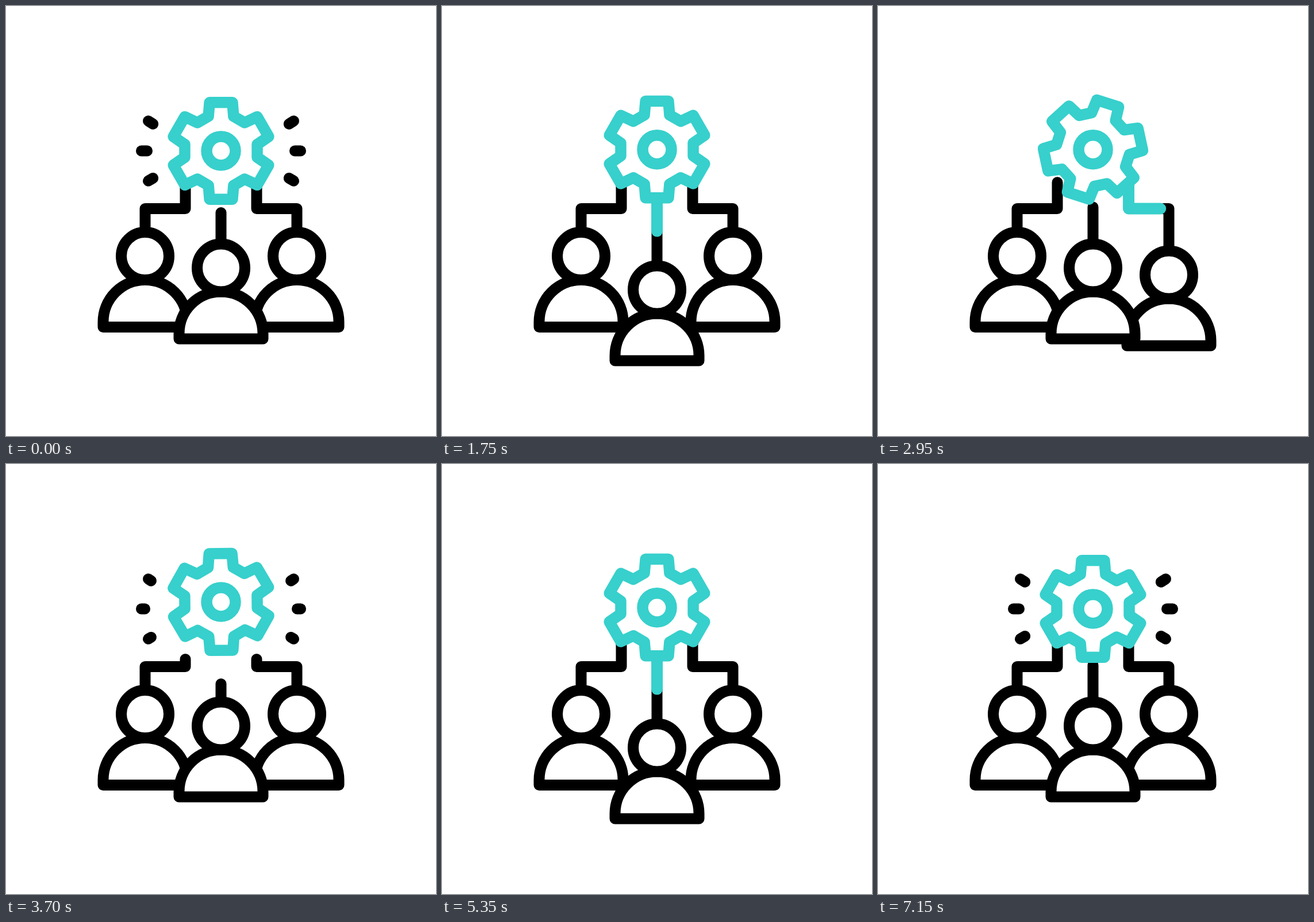
An HTML page with a canvas for the animation above (7.2 s loop, 748 by 748 pixels).

```html
<!DOCTYPE html>
<html lang="en">
<head>
<meta charset="utf-8">
<title>Team gear</title>
<style>
html, body { margin: 0; width: 100%; height: 100%; overflow: hidden; background: #fff; }
canvas { display: block; width: 100vmin; height: 100vmin; }
</style>
</head>
<body>
<canvas id="stage" width="748" height="748"></canvas>
<script>
const ctx = document.getElementById('stage').getContext('2d');
const TEAL = '#37d0cc', BLACK = '#000', WHITE = '#fff';
const CX = 374, CY = 252, CYCLE = 3600, BEAT = 1200, STEP = 50;

// one person per beat: left, middle, right
const people = [
  { x: 242, y: 0, lineX: 312, top: 298, dip: 49, flow: 300 },
  { x: 374, y: 20.5, lineX: 374, top: 341, dip: 38, flow: 380 },
  { x: 506, y: 0, lineX: 436, top: 298, dip: 32.5, flow: 300 }
];

const clamp = v => Math.max(0, Math.min(1, v));
const ramp = (t, a, b) => clamp((t - a) / (b - a));
const ease = u => u < 0.5 ? 2 * u * u : 1 - 2 * (1 - u) * (1 - u);
const swell = u => Math.sin(u * Math.PI / 2) ** 2;

function stroke(color, width) {
  ctx.strokeStyle = color;
  ctx.lineWidth = width;
  ctx.stroke();
}

function trace(points) {
  ctx.beginPath();
  points.forEach(([x, y]) => ctx.lineTo(x, y));
}

function dipAt(p) {
  return p < 550 ? swell(ramp(p, 265, 550)) : 1 - swell(ramp(p, 550, 870));
}

function hopAt(p) {
  return p < 600 ? 68 * Math.sin(Math.PI * p / 600) ** 2.5 : 0;
}

// connector tops pull away from the gear around each hop
function retractAt(p) {
  const d = (p - 250 + 1.5 * BEAT) % BEAT - BEAT / 2;
  return Math.abs(d) < 400 ? 60 * Math.cos(d / 400 * Math.PI / 2) ** 2 : 0;
}

function linkPoints(who, drop, retract) {
  const top = [who.lineX, who.top + retract];
  const head = [who.x, 394 + who.y + drop];
  return who.x === who.lineX
    ? [top, head]
    : [top, [who.lineX, 352.5], [who.x, 352.5], head];
}

function drawFlow(points, from, to) {
  if (to <= from) return;
  let len = 0;
  for (let i = 1; i < points.length; i++) {
    len += Math.hypot(points[i][0] - points[i - 1][0], points[i][1] - points[i - 1][1]);
  }
  trace(points);
  ctx.setLineDash([(to - from) * len, 9999]);
  ctx.lineDashOffset = -from * len;
  stroke(TEAL, 20);
  ctx.setLineDash([]);
}

function drawPerson(who, drop) {
  const y = who.y + drop;
  ctx.fillStyle = WHITE;
  ctx.beginPath();
  ctx.arc(who.x, 549.5 + y, 73, Math.PI, 0);
  ctx.lineTo(who.x + 73, 558.5 + y);
  ctx.lineTo(who.x - 73, 558.5 + y);
  ctx.closePath();
  ctx.fill();
  stroke(BLACK, 19);
  ctx.beginPath();
  ctx.arc(who.x, 435 + y, 41.5, 0, 2 * Math.PI);
  ctx.fill();
  stroke(BLACK, 19);
}

function drawGear(y, turn) {
  const points = [];
  for (let i = 0; i < 6; i++) {
    [[-20, 64], [-13.3, 86.5], [13.3, 86.5], [20, 64]].forEach(([deg, r]) => {
      const a = (deg + i * 60 - 90 + turn) * Math.PI / 180;
      points.push([CX + r * Math.cos(a), y + r * Math.sin(a)]);
    });
  }
  trace(points);
  ctx.closePath();
  ctx.fillStyle = WHITE;
  ctx.fill();
  stroke(TEAL, 19.5);
  ctx.beginPath();
  ctx.arc(CX, y, 25, 0, 2 * Math.PI);
  stroke(TEAL, 19.5);
}

function drawRays(grow, fade) {
  if (grow <= fade) return;
  // inner and outer ends, measured from the gear centre
  const rays = [[118.3, -46.7, 126.5, -52], [128.5, 0, 138.5, 0], [118.3, 47.5, 126.5, 52.3]];
  for (const side of [-1, 1]) {
    for (const [x0, y0, x1, y1] of rays) {
      const at = u => [CX + side * (x0 + (x1 - x0) * u), CY + y0 + (y1 - y0) * u];
      trace([at(fade), at(grow)]);
      stroke(BLACK, 19 * Math.min(1, grow * 4, (1 - fade) * 4));
    }
  }
}

function draw(t) {
  const beat = Math.floor(t / BEAT), p = t % BEAT;
  const retract = retractAt(p);
  ctx.fillStyle = WHITE;
  ctx.fillRect(0, 0, 748, 748);
  ctx.lineCap = ctx.lineJoin = 'round';

  const drops = people.map((who, i) => i === beat ? who.dip * dipAt(p) : 0);
  people.forEach((who, i) => {
    trace(linkPoints(who, drops[i], retract));
    stroke(BLACK, 19);
    // the flow starts slightly higher, tucked under the gear rim
    if (i === beat) {
      drawFlow(linkPoints(who, drops[i], retract - 10), ramp(p, 800, 1100), ramp(p, who.flow, 750));
    }
  });
  [0, 2, 1].forEach(i => drawPerson(people[i], drops[i]));

  if (t >= 3100) drawRays(ramp(t, 3100, 3450), 0);
  else drawRays(1, ramp(t, 0, 250));
  drawGear(CY - hopAt(p), -360 * ease(ramp(t, 0, 3500)));
}

const start = performance.now();
function frame() {
  const t = Math.floor((performance.now() - start) / STEP) * STEP;
  draw(t % CYCLE);
  requestAnimationFrame(frame);
}
frame();
</script>
</body>
</html>
```
